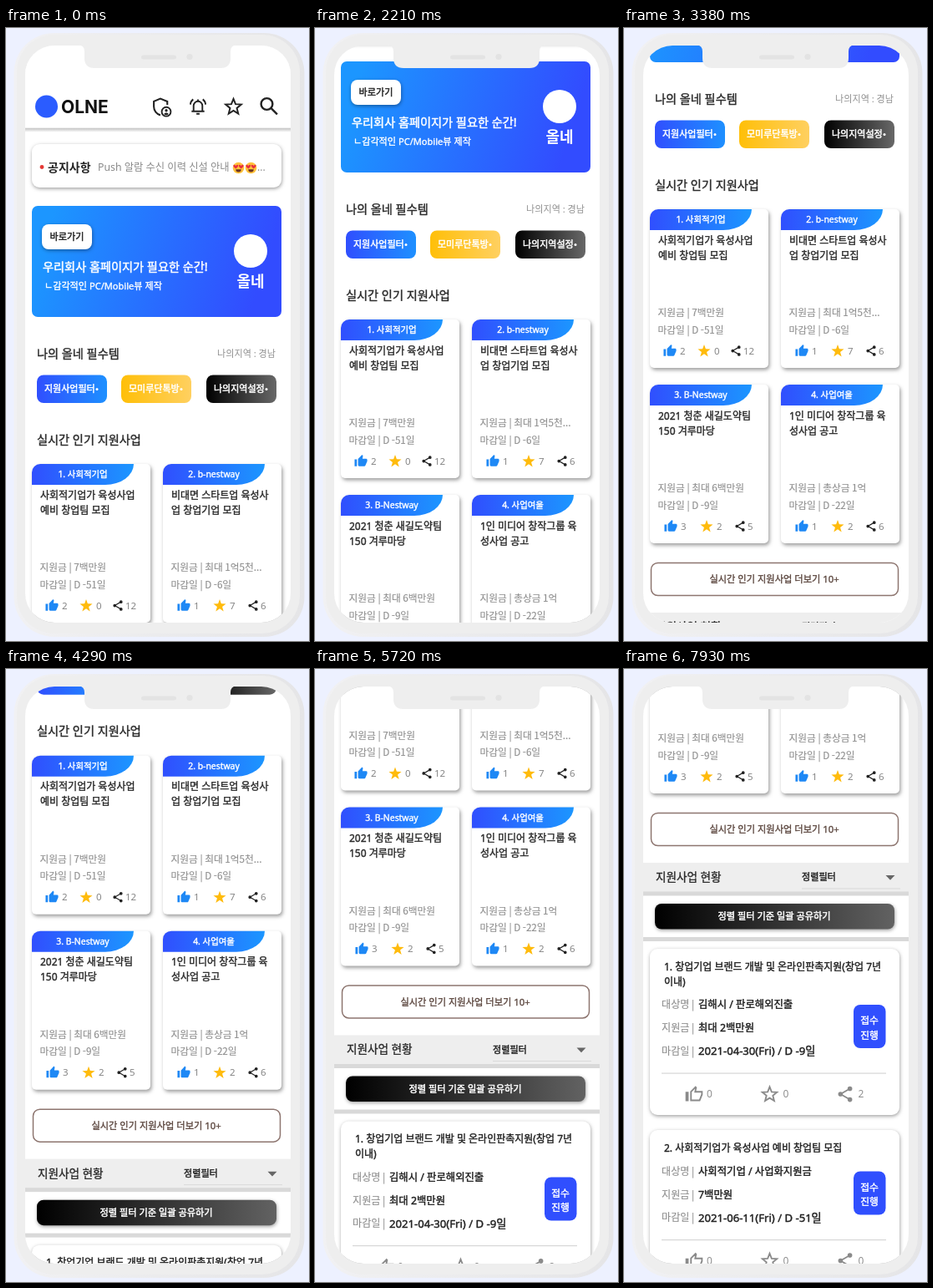
Animation, 363 px wide and 734 px high, one loop 8000 ms. Source, as an HTML page with a canvas:

```html
<!DOCTYPE html>
<html lang="ko">
<head>
<meta charset="utf-8">
<title>지원사업 앱</title>
<style>
html, body { margin: 0; width: 100%; height: 100%; overflow: hidden; background: #edf1ff; }
canvas { display: block; width: 363px; height: 734px; }
</style>
</head>
<body>
<canvas id="stage"></canvas>
<script>
const W = 363, H = 734, LOOP = 8000, STEP = 130;
const canvas = document.getElementById('stage');
const c = canvas.getContext('2d');
const dpr = window.devicePixelRatio || 1;
canvas.width = W * dpr;
canvas.height = H * dpr;

const CJK = '"Noto Sans CJK KR", "Noto Sans CJK JP", "Noto Sans CJK SC", "Noto Sans CJK", sans-serif';
const FONT = '"Noto Sans", ' + CJK;
const INK = '#2b2b2b', GREY = '#8f8f8f', BLUE = '#304ffe', SKY = '#1c96ff';

// Scroll: time in ms, distance in px, speed in px per ms
const KEYS = [
  [0, 0, 0.01], [1170, 50.5, 0.082], [2210, 173, 0.115], [3380, 305, 0.117],
  [5070, 509, 0.102], [6760, 651, 0.094], [7930, 773, 0.106]
];

function scrollAt(t) {
  let i = 0;
  while (i < KEYS.length - 2 && t > KEYS[i + 1][0]) i++;
  const [t0, p0, v0] = KEYS[i], [t1, p1, v1] = KEYS[i + 1];
  const d = t1 - t0, u = (t - t0) / d, u2 = u * u, u3 = u2 * u;
  return (2 * u3 - 3 * u2 + 1) * p0 + (u3 - 2 * u2 + u) * d * v0 +
         (3 * u2 - 2 * u3) * p1 + (u3 - u2) * d * v1;
}

// y is the optical middle of the line; thick adds a little weight
function text(str, x, y, size, color, thick = 0, align = 'left', weight = 400, font = FONT) {
  c.font = `${weight} ${size}px ${font}`;
  c.textAlign = align;
  c.textBaseline = 'alphabetic';
  c.fillStyle = c.strokeStyle = color;
  const base = y + size * 0.36;
  c.fillText(str, x, base);
  if (thick) {
    c.lineWidth = thick;
    c.lineJoin = 'round';
    c.strokeText(str, x, base);
  }
}

const label = (str, x, y, size) => text(str, x, y, size, GREY, 0.15, 'left', 400, CJK);

function box(x, y, w, h, r, fill) {
  c.beginPath();
  c.roundRect(x, y, w, h, r);
  c.fillStyle = fill;
  c.fill();
}

function panel(x, y, w, h, r, fill = '#fff', shift = 0.5) {
  c.save();
  c.shadowColor = 'rgba(0,0,0,.38)';
  c.shadowBlur = 4.5 * dpr;
  c.shadowOffsetX = shift * dpr;
  c.shadowOffsetY = (shift + 1) * dpr;
  box(x, y, w, h, r, fill);
  c.restore();
}

function disc(x, y, r, fill) {
  c.beginPath();
  c.arc(x, y, r, 0, 7);
  c.fillStyle = fill;
  c.fill();
}

function blend(x0, y0, x1, y1, a, b) {
  const g = c.createLinearGradient(x0, y0, x1, y1);
  g.addColorStop(0, a);
  g.addColorStop(1, b);
  return g;
}

const starPoints = (R, r) => 'M' + Array.from({ length: 10 }, (_, i) => {
  const a = i * Math.PI / 5, k = i % 2 ? r : R;
  return (12 + k * Math.sin(a)) + ' ' + (12.6 - k * Math.cos(a));
}).join('L') + 'Z';

// Icons live in a 24 unit box
const ICON = {
  star: starPoints(10.6, 4.3),
  starLine: starPoints(9.4, 4.1),
  thumb: 'M1 9h4v12H1zM7 8.5 14 1l1.6 2-.9 5H21a2 2 0 0 1 2 2v2.5l-3.3 7.5a2 2 0 0 1-1.8 1H9a2 2 0 0 1-2-2z',
  thumbBar: 'M1 9h4v12H1z',
  thumbLine: 'M8 9 13.8 3l.7.8L13.4 9H22v3.5L19 20H8z',
  shareDots: 'M21 5a3 3 0 1 1-6 0 3 3 0 0 1 6 0M9 12a3 3 0 1 1-6 0 3 3 0 0 1 6 0M21 19a3 3 0 1 1-6 0 3 3 0 0 1 6 0',
  shareLine: 'M18 5 6 12l12 7',
  search: 'M15.2 9.5a5.7 5.7 0 1 1-11.4 0 5.7 5.7 0 0 1 11.4 0M13.8 13.8 19.8 19.8',
  shield: 'M18 9V5.2L10 2 2.5 5.2V11c0 5 3.2 9 7.5 10',
  person: 'M22 17a5.2 5.2 0 1 1-10.4 0 5.2 5.2 0 0 1 10.4 0',
  personFill: 'M18.4 15.6a1.6 1.6 0 1 1-3.2 0 1.6 1.6 0 0 1 3.2 0M14 19.6q2.8-2.8 5.6 0-2.8 2.4-5.6 0',
  bell: 'M12 3v2M6.5 18v-7a5.5 5.5 0 0 1 11 0v7M4 18h16M10 21.2h4M2.5 9.5A9 9 0 0 1 6 3M21.5 9.5A9 9 0 0 0 18 3'
};
for (const k in ICON) ICON[k] = new Path2D(ICON[k]);

function icon(name, x, y, size, color, line = 0) {
  c.save();
  c.translate(x - size / 2, y - size / 2);
  c.scale(size / 24, size / 24);
  c.lineJoin = 'miter';
  if (line) {
    c.strokeStyle = color;
    c.lineWidth = line;
    c.stroke(ICON[name]);
  } else {
    c.fillStyle = color;
    c.fill(ICON[name]);
  }
  c.restore();
}

function share(x, y, size, color) {
  icon('shareLine', x, y, size, color, 1.9);
  icon('shareDots', x, y, size, color);
}

function heart(x, y, s) {
  c.beginPath();
  c.moveTo(x, y + s);
  c.bezierCurveTo(x - 2 * s, y - s * 0.4, x - s, y - 1.6 * s, x, y - s * 0.4);
  c.bezierCurveTo(x + s, y - 1.6 * s, x + 2 * s, y - s * 0.4, x, y + s);
  c.fillStyle = '#e8303f';
  c.fill();
}

function emoji(x, y) {
  disc(x, y, 6.8, '#ffc23a');
  heart(x - 3.2, y - 1.6, 2.5);
  heart(x + 3.2, y - 1.6, 2.5);
  c.beginPath();
  c.arc(x, y + 1.8, 3.2, 0, Math.PI);
  c.fillStyle = '#6b3320';
  c.fill();
}

function header() {
  c.fillStyle = blend(0, 119, 0, 125, '#b9b9b9', '#ffffff');
  c.fillRect(23, 119.5, 318, 5);
  c.fillStyle = '#fff';
  c.fillRect(23, 0, 318, 119.5);
  disc(48.5, 94, 13.5, '#2b5cff');
  text('OLNE', 66, 94, 21, '#111', 0, 'left', 700, 'Inter, sans-serif');
  icon('shield', 187, 95, 25, '#222', 2);
  icon('person', 187, 95, 25, '#222', 1.8);
  icon('personFill', 187, 95, 25, '#222');
  icon('bell', 230, 94, 23, '#222', 2);
  icon('starLine', 272.5, 94, 25, '#222', 1.9);
  icon('search', 315.5, 94, 29, '#222', 2);
}

function notice() {
  panel(31, 139, 299, 52, 9);
  disc(43, 166.5, 2.4, '#e53935');
  text('공지사항', 50, 167, 14, '#222', 0, 'left', 700);
  text('Push 알람 수신 이력 신설 안내', 110, 167, 12.3, '#8a8a8a');
  emoji(278.5, 167.5);
  emoji(293.5, 167.5);
  text('...', 301, 167, 12, '#8a8a8a');
}

function banner() {
  box(31, 213, 299, 133, 7, blend(50, 240, 300, 320, SKY, '#324cff'));
  panel(43, 235, 60, 30, 8);
  text('바로가기', 73, 250, 11.1, '#222', 0.45, 'center');
  text('우리회사 홈페이지가 필요한 순간!', 44, 286, 14.2, '#fff', 0.5);
  text('ㄴ감각적인 PC/Mobile뷰 제작', 46, 309, 11.1, '#fff', 0.35);
  disc(293, 267, 20, '#fff');
  text('올네', 293, 304, 18, '#fff', 0, 'center', 700);
}

function chip(x, str, a, b) {
  box(x, 415.5, 84, 33.5, 8, blend(x, 0, x + 84, 0, a, b));
  text(str, x + 9, 432.5, 11, '#fff', 0.5);
  disc(x + 72, 432.5, 1.5, '#fff');
}

function essentials() {
  text('나의 올네 필수템', 37, 389.5, 14.2, INK, 0.4);
  text('나의지역 : 경남', 323, 390, 11.1, GREY, 0, 'right');
  chip(37, '지원사업필터', BLUE, '#1e90ff');
  chip(138, '모미루단톡방', '#ffbf08', '#ffd060');
  chip(240, '나의지역설정', '#000', '#686868');
  text('실시간 인기 지원사업', 37, 492.5, 14.2, INK, 0.4);
}

function badge(x, y, str) {
  const round = [{ x: 10, y: 10 }, 0, { x: 34, y: 25 }, 0];
  box(x, y, 122, 25, round, blend(x, 0, x + 122, 0, BLUE, SKY));
  text(str, x + 61, y + 12.5, 10.4, '#fff', 0.4, 'center');
}

function card(x, y, tag, lines, fund, due, counts) {
  panel(x, y, 142, 190, [10, 5, 5, 5], '#fff', 1.5);
  badge(x, y, tag);
  lines.forEach((s, i) => text(s, x + 10, y + 37.5 + i * 18, 12, INK, 0.4));
  label('지원금 | ' + fund, x + 9.5, y + 124, 11.7);
  label('마감일 | ' + due, x + 9.5, y + 144.5, 11.7);
  const wide = counts[2].length > 1;
  const at = wide ? [24, 65, 103] : [25, 68, 108];
  const row = y + 169.5;
  icon('thumb', x + at[0], row, 16.5, '#1e88f5');
  icon('star', x + at[1], row, 18, '#ffbb0c');
  share(x + at[2], row, 15, '#222');
  counts.forEach((n, i) => text(n, x + at[i] + [12, 12, 9][i], row, 11.5, '#858585'));
}

function popular() {
  card(31, 522, '1. 사회적기업', ['사회적기업가 육성사업', '예비 창업팀 모집'], '7백만원', 'D -51일', ['2', '0', '12']);
  card(188, 522, '2. b-nestway', ['비대면 스타트업 육성사', '업 창업기업 모집'], '최대 1억5천...', 'D -6일', ['1', '7', '6']);
  card(31, 732, '3. B-Nestway', ['2021 청춘 새길도약팀', '150 겨루마당'], '최대 6백만원', 'D -9일', ['3', '2', '5']);
  card(188, 732, '4. 사업여울', ['1인 미디어 창작그룹 육', '성사업 공고'], '총상금 1억', 'D -22일', ['1', '2', '6']);
  c.beginPath();
  c.roundRect(32.5, 945.5, 296, 39, 8);
  c.strokeStyle = '#8d756f';
  c.lineWidth = 1.5;
  c.stroke();
  text('실시간 인기 지원사업 더보기 10+', 180, 965, 11.25, '#5d4840', 0.35, 'center');
}

function filterBar() {
  c.fillStyle = '#eeeeee';
  c.fillRect(23, 1005, 318, 35);
  c.fillStyle = '#d9d9d9';
  c.fillRect(213, 1035.5, 118, 1);
  c.fillRect(23, 1039.5, 318, 5);
  c.fillRect(23, 1094, 318, 5);
  text('지원사업 현황', 38, 1022, 13.6, INK, 0.35);
  text('정렬필터', 213, 1022.5, 11.1, '#222', 0.45);
  c.beginPath();
  c.moveTo(313.5, 1020);
  c.lineTo(324.5, 1020);
  c.lineTo(319, 1025.8);
  c.fillStyle = '#666';
  c.fill();
  panel(37, 1054, 287, 30.5, 8, blend(37, 0, 324, 0, '#000', '#626262'));
  text('정렬 필터 기준 일괄 공유하기', 180, 1069, 11.2, '#fff', 0.5, 'center');
}

// y is the middle of the first detail row
function entry(top, y, lines, rows, counts) {
  panel(31, top, 299, y + 132 - top, 9);
  lines.forEach((s, i) => text(s, 48, top + 21.5 + i * 18, 12, '#222', 0.4));
  ['대상명', '지원금', '마감일'].forEach((name, i) => {
    const row = y + i * 27.7;
    label(name + ' |', 45, row, 12.1);
    text(rows[i], 89, row, i === 2 ? 13.1 : 12.35, '#222', 0.45);
  });
  box(275, y, 38.5, 52, 8, BLUE);
  text('접수', 294, y + 19, 11.8, '#fff', 0.45, 'center');
  text('진행', 294, y + 36.5, 11.8, '#fff', 0.45, 'center');
  c.fillStyle = '#d6d6d6';
  c.fillRect(45, y + 81.5, 269, 1.2);
  const row = y + 107;
  icon('thumbBar', 84, row, 22.5, '#8a8a8a');
  icon('thumbLine', 84, row, 22.5, '#8a8a8a', 2);
  icon('starLine', 174.5, row, 23.5, '#8a8a8a', 1.9);
  share(265, row, 22.5, '#8a8a8a');
  counts.forEach((n, i) => text(n, [99, 190.5, 280.5][i], row, 12, GREY));
}

function list() {
  entry(1108, 1175, ['1. 창업기업 브랜드 개발 및 온라인판촉지원(창업 7년', '이내)'],
    ['김해시 / 판로해외진출', '최대 2백만원', '2021-04-30(Fri) / D -9일'], ['0', '0', '2']);
  entry(1325, 1374.5, ['2. 사회적기업가 육성사업 예비 창업팀 모집'],
    ['사회적기업 / 사업화지원금', '7백만원', '2021-06-11(Fri) / D -51일'], ['0', '0', '0']);
}

function body() {
  c.fillStyle = '#edf1ff';
  c.fillRect(0, 0, W, H);
  box(9.5, 6, 348, 723, 48, blend(10, 0, 357, 0, '#f1f1f3', '#e5e5e7'));
  box(13, 8, 339, 717, 45, '#eeeeee');
}

function notch() {
  c.beginPath();
  c.moveTo(87, 20);
  c.quadraticCurveTo(94, 21, 94, 28);
  c.lineTo(94, 36);
  c.quadraticCurveTo(94, 48, 106, 48);
  c.lineTo(257, 48);
  c.quadraticCurveTo(269, 48, 269, 36);
  c.lineTo(269, 28);
  c.quadraticCurveTo(269, 21, 276, 20);
  c.fillStyle = '#eeeeee';
  c.fill();
  box(162, 32.5, 42, 5, 2.5, '#e3e3e3');
  disc(220, 34.5, 3.6, '#e3e3e3');
}

function draw(t) {
  c.setTransform(dpr, 0, 0, dpr, 0, 0);
  body();
  c.save();
  c.beginPath();
  c.roundRect(23, 21, 318, 691, 35);
  c.clip();
  c.fillStyle = '#fff';
  c.fillRect(23, 21, 318, 691);
  c.translate(0, -scrollAt(t));
  [header, notice, banner, essentials, popular, filterBar, list].forEach(part => part());
  c.restore();
  notch();
}

function tick() {
  const t = performance.now() % LOOP;
  draw(Math.floor(t / STEP) * STEP);
  requestAnimationFrame(tick);
}
tick();
</script>
</body>
</html>
```
